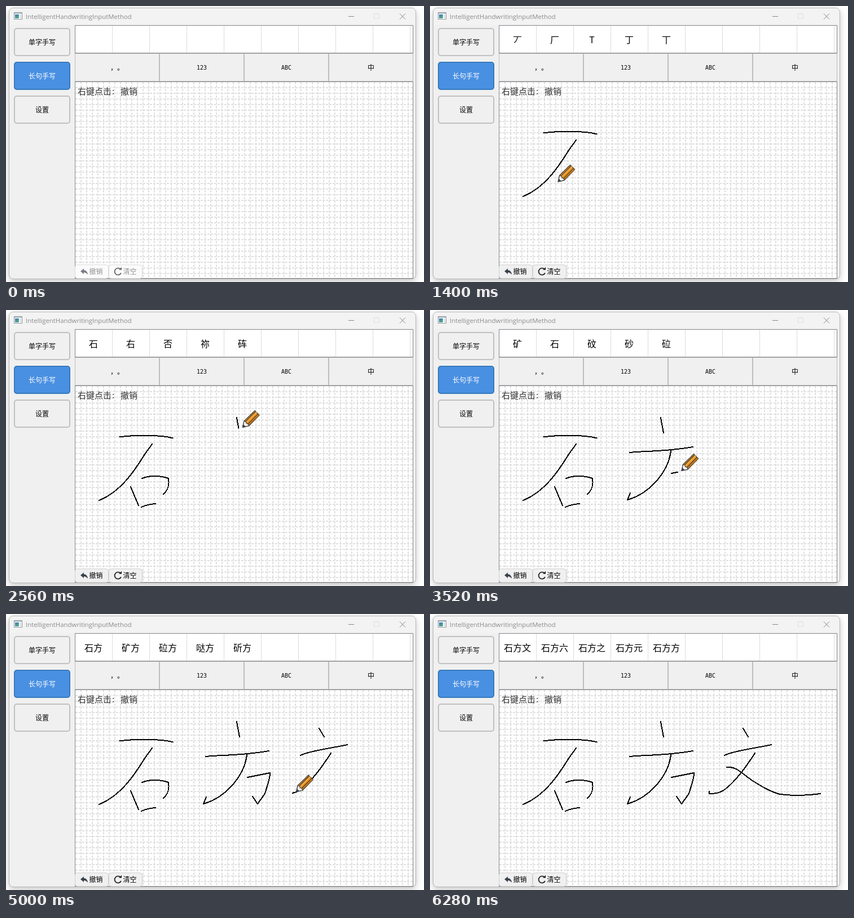
Write an HTML page that moves like this. It is 741 px wide and 490 px high and loops after 7.4 s.

```html
<!DOCTYPE html>
<html lang="zh-CN">
<head>
<meta charset="utf-8">
<title>Handwriting input</title>
<style>
  html, body { margin: 0; width: 100%; height: 100%; overflow: hidden; background: #fff; }
  svg { display: block; width: 741px; height: 490px; }
  .window { position: absolute; left: 5px; top: 3px; width: 720px; height: 480px; border: 1px solid #b4b4b4;
    border-radius: 8px; background: #f0f0f0; box-shadow: 0 4px 12px rgba(0, 0, 0, .22); }
  #stage { position: absolute; left: 0; top: 0; width: 741px; height: 490px; overflow: hidden; }
  #stage svg { position: absolute; left: 0; top: 0; }
  text { font: 12px "Noto Sans CJK SC", "Noto Sans CJK", sans-serif; fill: #000; text-anchor: middle;
    text-spacing-trim: space-all; font-kerning: none; }
  .title { font: 11.4px "Open Sans", sans-serif; fill: #8a8a8a; text-anchor: start; }
  .latin { font: 10px "DejaVu Sans Mono", monospace; }
  .hint text { font-size: 15px; fill: #333; text-anchor: start; }
  #words text { font-size: 16px; }
  .crisp { shape-rendering: crispEdges; }
  .side rect { fill: #f0f0f0; stroke: #c0c0c0; stroke-width: 2; }
  .side .on rect { fill: #4a90e2; stroke: #357abd; }
  .side .on text { fill: #fff; }
  #ink path { fill: none; stroke: #000; stroke-width: 2; stroke-linecap: round; stroke-linejoin: round; }
  #tools rect { fill: #f0f0f0; stroke: #d0d0d0; }
  #tools.off rect { fill: #fbfbfb; stroke: #dcdcdc; }
  #tools.off text { fill: #929292; }
  #tools.off .icon { opacity: .68; }
</style>
</head>
<body>
<div id="stage">
  <div class="window"></div>
  <svg viewBox="0 0 741 490">
    <defs>
      <linearGradient id="screen" x2="1" y2="1">
        <stop stop-color="#3d78b8"/><stop offset="1" stop-color="#58b383"/>
      </linearGradient>
    </defs>
    <path d="M6 33V12Q6 4 14 4H718Q726 4 726 12V33Z" fill="#f3f3f3"/>
    <g class="crisp">
      <rect x="14.5" y="11.5" width="14" height="12" fill="#fff" stroke="#8b969c"/>
      <path d="M15 13H28" stroke="#b9c4ca" stroke-width="2"/>
      <rect x="16" y="15" width="7" height="7" fill="url(#screen)"/>
      <path d="M25 16H27M25 18H27M25 20H27" stroke="#b5b5b5"/>
    </g>
    <text class="title" x="35" y="23">IntelligentHandwritingInputMethod</text>
    <path d="M607 18.5H617M698 13.5L708 23.5M708 13.5L698 23.5" stroke="#858585" fill="none"/>
    <rect x="652.5" y="13.5" width="9" height="9" rx="1" fill="none" stroke="#dedede"/>

    <g class="side" id="side"></g>

    <g class="crisp">
      <rect x="122.5" y="34.5" width="599" height="49" fill="#fff" stroke="#83868c"/>
      <path id="columns" stroke="#dcdcdc"/>
      <g id="keys"></g>
      <rect x="122.5" y="134.5" width="599" height="349" fill="#fff" stroke="#83868c"/>
      <path id="grid" stroke="#e0e0e0" stroke-width="2" stroke-dasharray="4 2" fill="none"/>
    </g>
    <g id="keyText"></g>
    <g id="words"></g>
    <g class="hint">
      <text x="127" y="157">右键点击</text><text x="188" y="157">:</text><text x="203" y="157">撤销</text>
    </g>
    <g id="tools">
      <rect x="122.5" y="459.5" width="59" height="24" rx="4"/>
      <rect x="182.5" y="459.5" width="59" height="24" rx="4"/>
      <path class="icon" d="M132 471L138 466V469Q144 469 145 477Q142 473 138 473V476Z" fill="#3b414b"/>
      <g class="icon" fill="none" stroke="#202020" stroke-width="1.8">
        <path d="M203 467.3A6 6 0 1 0 204 474"/>
        <path d="M200 468.5H205V463.5Z" fill="#202020" stroke="none"/>
      </g>
      <text x="159.5" y="476">撤销</text><text x="219.5" y="476">清空</text>
    </g>
    <g id="ink" class="crisp"></g>
    <g id="pencil" stroke-linejoin="round">
      <path d="M.5-.5L3-11.5L22-30L30-22L11.5-3Z" fill="#e8952a" stroke="#444" stroke-width="1.4"/>
      <path d="M7-10L25.5-27.5" stroke="#f2a845" stroke-width="2.5"/>
      <path d="M5.5-10.5L23-28M9.5-6L27.5-24" stroke="#4a3820" stroke-width="1.3"/>
      <path d="M11-4.5L29.5-22.5" stroke="#b86a14" stroke-width="1.6"/>
      <path d="M.5-.5L3-11.5Q7-11 7-7.5Q11-7 11.5-3Z" fill="#f4f1ea" stroke="#444" stroke-width="1.2"/>
      <path d="M0 0L1.5-6L6-1.5Z" fill="#3c404a"/>
    </g>
  </svg>
</div>
<script>
const $ = id => document.getElementById(id);
const add = (parent, tag, attrs, text = '') => {
  const el = document.createElementNS('http://www.w3.org/2000/svg', tag);
  for (const k in attrs) el.setAttribute(k, attrs[k]);
  el.textContent = text;
  return parent.appendChild(el);
};
const range = (from, to, step, fn) => {
  let s = '';
  for (let v = from; v < to; v += step) s += fn(v);
  return s;
};

['单字手写', '长句手写', '设置'].forEach((label, i) => {
  const g = add($('side'), 'g', { class: i === 1 ? 'on' : '' });
  add(g, 'rect', { x: 15, y: 40 + 60 * i, width: 98, height: 48, rx: 4 });
  add(g, 'text', { x: 64, y: 68.5 + 60 * i }, label);
});
['，。', '123', 'ABC', '中'].forEach((label, i) => {
  const x = 122 + 150 * i, latin = /\w/.test(label);
  add($('keys'), 'rect', { x: x + .5, y: 84.5, width: 149, height: 49, fill: '#f0f0f0', stroke: '#bdbdbd' });
  add($('keyText'), 'text', { x: x + 75, y: latin ? 113 : 114, class: latin ? 'latin' : '' }, label);
});
$('columns').setAttribute('d', range(188.5, 721, 66, x => `M${x} 35V83`));
$('grid').setAttribute('d',
  range(133, 721, 10, x => `M${x} 135V483`) + range(145, 483, 10, y => `M123 ${y}H721`));

// Pen strokes: start ms, end ms, path
const strokes = [
  [200, 520, 'M201 225.5C225 222 272 221 296 227.5'],
  [760, 1160, 'M259 238L246 256C230 282 205 322 165 338'],
  [1430, 1520, 'M221 314L235 347'],
  [1620, 1900, 'M241 299C255 293 275 294 288 299C290 312 287 320 279 327'],
  [2000, 2120, 'M240 350Q250 345 265 344'],
  [2520, 2575, 'M409 191Q411 203 414 218'],
  [2760, 3000, 'M354 253C380 250 415 252 466 243'],
  [3160, 3400, 'M427 250C423 285 392 325 350 337L355 325'],
  [3490, 3800, 'M428 290L468 282C468 295 462 307 459 319L446 337L437 324'],
  [4270, 4360, 'M555 203L564 218'],
  [4520, 4600, 'M522 251C540 242 580 238 605 232'],
  [4820, 5030, 'M576 247C560 272 541 296 527 308C517 317 508 319 495 319V315'],
  [5200, 5560, 'M526 272C545 270 555 286 575 298C592 309 605 316 620 320C645 323 672 322 692 319']
].map(([start, end, d]) => {
  const el = add($('ink'), 'path', { d });
  const len = el.getTotalLength();
  return { start, end, el, len, from: el.getPointAtLength(0), to: el.getPointAtLength(len) };
});

// Candidate lists by time
const lists = [
  [0, ''],
  [560, '一 — - ― ～'],
  [1240, '丆 厂 T 丁 丅'],
  [1560, '厂 广 丆 下 个'],
  [1960, '右 后 石 佑 庐'],
  [2200, '石 右 否 祢 砗'],
  [2680, '石 砂 右 矽 砾'],
  [3080, '石 砬 矿 砂 碎'],
  [3440, '矿 石 砇 砂 砬'],
  [3960, '石 方 紡 纺 仿'],
  [4800, '石方 矿方 砬方 哒方 斫方'],
  [5120, '石方方 石方六 石方亢 石方广 石方亦'],
  [5760, '石方文 石方六 石方之 石方元 石方方']
];
const slots = [0, 1, 2, 3, 4].map(i => add($('words'), 'text', { x: 155 + 66 * i, y: 66 }));

const LOOP = 7400, STEP = 40;
const clamp = v => Math.max(0, Math.min(1, v));
const glide = (a, b, p) => {
  const k = Math.sin(clamp(p) * Math.PI / 2);
  return { x: a.x + (b.x - a.x) * k, y: a.y + (b.y - a.y) * k };
};

function penAt(t) {
  let at = { x: 170, y: 190 }, since = 40;
  for (const s of strokes) {
    if (t < s.start) {
      // the app stalls before the long bar of the last character
      return s.start === 4520 ? at : glide(at, s.from, (t - since) / (s.start - since));
    }
    if (t < s.end) return s.el.getPointAtLength(s.len * (t - s.start) / (s.end - s.start));
    at = s.to;
    since = s.end;
  }
  return glide(at, { x: 572.5, y: 479 }, (t - since) / (6200 - since));
}

function draw(t) {
  for (const s of strokes) {
    const p = clamp((t - s.start) / (s.end - s.start));
    s.el.style.visibility = p > 0 ? 'visible' : 'hidden';
    s.el.style.strokeDasharray = p < 1 ? `${s.len * p} ${s.len + 9}` : 'none';
  }
  const words = lists.filter(l => l[0] <= t).pop()[1].split(' ');
  slots.forEach((el, i) => { el.textContent = words[i] || ''; });
  $('tools').setAttribute('class', t < 240 ? 'off' : '');
  const pen = penAt(t);
  $('pencil').setAttribute('transform', `translate(${pen.x + 6.5} ${pen.y - 2})`);
  $('pencil').style.visibility = t >= 40 && t < 6280 ? 'visible' : 'hidden';
}

const begin = performance.now();
function tick() {
  const t = (performance.now() - begin) % LOOP;
  draw(Math.floor(t / STEP) * STEP);
  requestAnimationFrame(tick);
}
draw(0);
requestAnimationFrame(tick);
</script>
</body>
</html>
```
